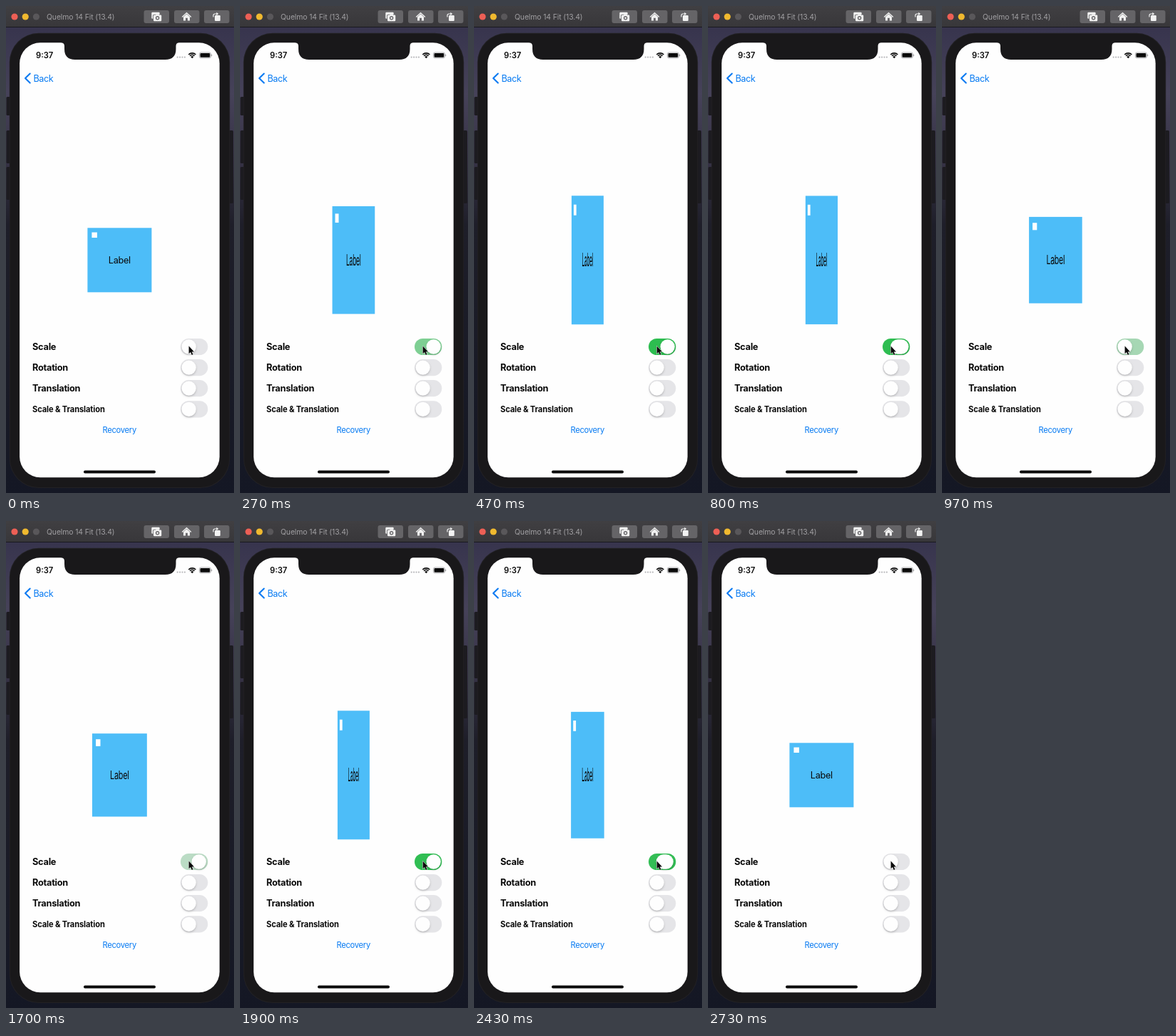
Write an HTML page with a canvas that moves like this. It is 320 px wide and 681 px high and loops after 2760 ms.

```html
<!DOCTYPE html>
<html lang="en">
<head>
<meta charset="utf-8">
<title>Transform demo</title>
<style>
html, body { margin: 0; width: 100%; height: 100%; overflow: hidden; background: #1b1b2a; }
canvas { display: block; width: 320px; height: 681px; }
</style>
</head>
<body>
<canvas id="stage"></canvas>
<script>
const W = 320, H = 681, LOOP = 2760;
const BLUE = '#067af2', INK = '#0a0a0a', WHITE = '#fefefe', BODY = '#19181a';
const FONT = 'Inter, Roboto, sans-serif';
const canvas = document.getElementById('stage');
const ctx = canvas.getContext('2d');
const dpr = window.devicePixelRatio || 1;
canvas.width = W * dpr;
canvas.height = H * dpr;

// Moments at which the first switch flips
const FLIPS = [
  { at: 84, on: 1 },
  { at: 787, on: 0 },
  { at: 1585, on: 1 },
  { at: 2390, on: 0 }
];
const SCALE_MS = 310, KNOB_MS = 140, PRESS_MS = 75;

const clamp = x => Math.max(0, Math.min(1, x));

// cubic-bezier(.42, 0, .58, 1)
function ease(x) {
  if (x <= 0) return 0;
  if (x >= 1) return 1;
  let lo = 0, hi = 1, u = x;
  for (let i = 0; i < 20; i++) {
    u = (lo + hi) / 2;
    const bx = 1.26 * u * (1 - u) * (1 - u) + 1.74 * u * u * (1 - u) + u * u * u;
    if (bx < x) lo = u; else hi = u;
  }
  return u * u * (3 - 2 * u);
}

function follow(t, msOn, msOff = msOn) {
  let v = 0;
  for (const f of FLIPS) {
    if (t >= f.at) {
      const k = ease((t - f.at) / (f.on ? msOn : msOff));
      v = f.on ? k : 1 - k;
    }
  }
  return v;
}

// How far the knob is stretched by a finger, 0 to 1
function press(t) {
  return Math.max(...FLIPS.map(f => {
    const d = t - f.at;
    return d < 0 ? clamp((d + PRESS_MS) / 55) : 1 - ease(d / 110);
  }));
}

function box(x, y, w, h, r, fill) {
  ctx.beginPath();
  ctx.roundRect(x, y, w, h, r);
  ctx.fillStyle = fill;
  ctx.fill();
}

function disc(x, y, r, fill) {
  ctx.beginPath();
  ctx.arc(x, y, r, 0, Math.PI * 2);
  ctx.fillStyle = fill;
  ctx.fill();
}

function text(str, x, y, size, weight, fill, spacing = 0, align = 'left') {
  ctx.font = `${weight} ${size}px ${FONT}`;
  ctx.letterSpacing = spacing + 'px';
  ctx.textAlign = align;
  ctx.fillStyle = fill;
  ctx.fillText(str, x, y);
}

function shape(d, fill, stroke, width) {
  const p = new Path2D(d);
  if (stroke) {
    ctx.strokeStyle = stroke;
    ctx.lineWidth = width;
    ctx.stroke(p);
  }
  if (fill) {
    ctx.fillStyle = fill;
    ctx.fill(p);
  }
}

function fade(y0, y1, stops) {
  const g = ctx.createLinearGradient(0, y0, 0, y1);
  for (const [at, color] of stops) g.addColorStop(at, color);
  ctx.fillStyle = g;
  ctx.fillRect(0, y0, W, y1 - y0);
}

function titleBar() {
  fade(0, 29.5, [[0, '#403f42'], [1, '#38373a']]);
  ctx.fillStyle = '#111116';
  ctx.fillRect(0, 29.2, W, 0.8);
  disc(12, 15, 4.6, '#ed5f55');
  disc(27.2, 15, 4.6, '#f0b92f');
  disc(42.4, 15, 4.6, '#59575a');
  text('Quelmo 14 Fit (13.4)', 57, 19, 10.4, 400, '#a09fa2', -0.1);
  const key = '#656467', icon = '#f2f2f2';
  for (const x of [193.5, 236, 278]) box(x, 6, 35.5, 18, 3, key);

  // Screenshot, home and rotate icons
  box(204.3, 8.8, 11.4, 9, 1.3, icon);
  box(206.2, 11.8, 12.8, 10, 1.5, key);
  box(207, 12.6, 11.2, 8.6, 1.2, icon);
  box(210.2, 11.3, 4.8, 2.2, 0.8, icon);
  disc(212.6, 16.8, 2.7, key);
  disc(212.6, 16.8, 1.4, icon);
  shape('M247.2 15.5L253.5 9.7L259.8 15.5', null, icon, 1.3);
  shape('M249 15.2L253.5 11.2L258 15.2V20.5H254.9V16.7H252.1V20.5H249Z', icon);
  box(293, 13, 7.8, 8, 1.2, icon);
  shape('M291 15.5V13.2Q291 11 293.2 11H296', null, icon, 1.2);
  shape('M295.3 8.8L298.3 11L295.3 13.2Z', icon);
}

function statusBar() {
  text('9:37', 42, 73.2, 11.2, 600, INK);
  for (let i = 0; i < 4; i++) disc(240.7 + i * 3.4, 71.6, 1.15, '#b9b9bc');
  ctx.strokeStyle = INK;
  ctx.lineWidth = 1.7;
  for (const r of [7.1, 4.6]) {
    ctx.beginPath();
    ctx.arc(261.3, 73, r, -Math.PI * 0.75, -Math.PI * 0.25);
    ctx.stroke();
  }
  shape('M261.3 73.2L259.2 71Q261.3 69.2 263.4 71Z', INK);
  ctx.beginPath();
  ctx.roundRect(271.4, 65, 16, 7.8, 2.2);
  ctx.strokeStyle = '#9a9a9d';
  ctx.lineWidth = 0.8;
  ctx.stroke();
  box(272.5, 66.1, 13.8, 5.6, 1.3, INK);
  box(288.2, 67.5, 1, 2.8, 0.5, '#9a9a9d');
}

function phone() {
  for (const [x, y, h] of [[0.5, 127, 26], [0.5, 174, 46], [0.5, 225, 46], [313, 174, 102]])
    box(x, y, 6, h, 1.5, '#1c1b20');
  box(4.8, 37.8, 309.4, 636.2, 41, '#222124');
  box(5.8, 38.8, 307.4, 634.2, 40, BODY);
  box(19.1, 51.3, 280.6, 607.9, 29, WHITE);
  shape('M77 51H243Q238.5 51.5 238.5 56V60Q238.5 75 223.5 75H97Q82 75 82 60V56Q82 51.5 77 51Z', BODY);
  statusBar();

  ctx.lineCap = ctx.lineJoin = 'round';
  shape('M33.7 94.6L27 101.1L33.7 107.6', null, BLUE, 2.1);
  ctx.lineCap = 'butt';
  ctx.lineJoin = 'miter';
  text('Back', 38.4, 105.5, 12.6, 400, BLUE, -0.35);

  text('Scale', 37, 481, 12.75, 700, INK, -0.25);
  text('Rotation', 37, 510, 12.75, 700, INK, -0.25);
  text('Translation', 37, 539, 12.75, 700, INK, -0.25);
  text('Scale & Translation', 37, 567.6, 11.1, 700, INK, -0.1);
  text('Recovery', 159.2, 597, 11.2, 400, BLUE, -0.28, 'center');
  box(109, 649.6, 101, 3.8, 1.9, INK);
}

function toggle(y, on = 0, tint = 0, stretch = 0) {
  const mix = (a, b) => Math.round(a + (b - a) * tint);
  const h = 23.2, w = 20.3 + 5.3 * stretch;
  box(245, y - h / 2, 38.3, h, h / 2, `rgb(${mix(229, 45)},${mix(229, 189)},${mix(232, 80)})`);
  const x = 246.5 + on * (35.3 - w);
  ctx.save();
  ctx.shadowColor = 'rgba(0,0,0,.2)';
  ctx.shadowBlur = 3 * dpr;
  ctx.shadowOffsetY = 1.4 * dpr;
  box(x, y - 10.15, w, 20.3, 10.15, WHITE);
  ctx.restore();
}

function card(p) {
  ctx.save();
  ctx.translate(159.4, 355.3);
  ctx.scale(1 - p / 2, 1 + p);
  ctx.fillStyle = '#4dbdf8';
  ctx.fillRect(-45, -45, 90, 90);
  ctx.fillStyle = WHITE;
  ctx.fillRect(-39, -38.8, 7.5, 7.5);
  text('Label', -0.1, 4.4, 12.7, 400, INK, -0.3, 'center');
  ctx.restore();
}

function cursor() {
  ctx.lineJoin = 'round';
  shape('M256.6 475.6V486.3L259 484.1L260.8 488L262.5 487.2L260.8 483.5H264Z', INK, '#f4f4f4', 1);
  ctx.lineJoin = 'miter';
}

function draw(t) {
  ctx.setTransform(dpr, 0, 0, dpr, 0, 0);
  fade(0, H, [[0.04, '#37344d'], [0.18, '#464259'], [0.32, '#363245'], [0.45, '#1e1e29'], [1, '#141724']]);
  titleBar();
  phone();
  card(follow(t, SCALE_MS));
  toggle(476.5, follow(t, KNOB_MS), follow(t, 350, 310), press(t));
  for (const y of [505.6, 534.6, 563.8]) toggle(y);
  cursor();
}

const start = performance.now();
function tick() {
  draw((performance.now() - start) % LOOP);
  requestAnimationFrame(tick);
}
tick();
</script>
</body>
</html>
```
